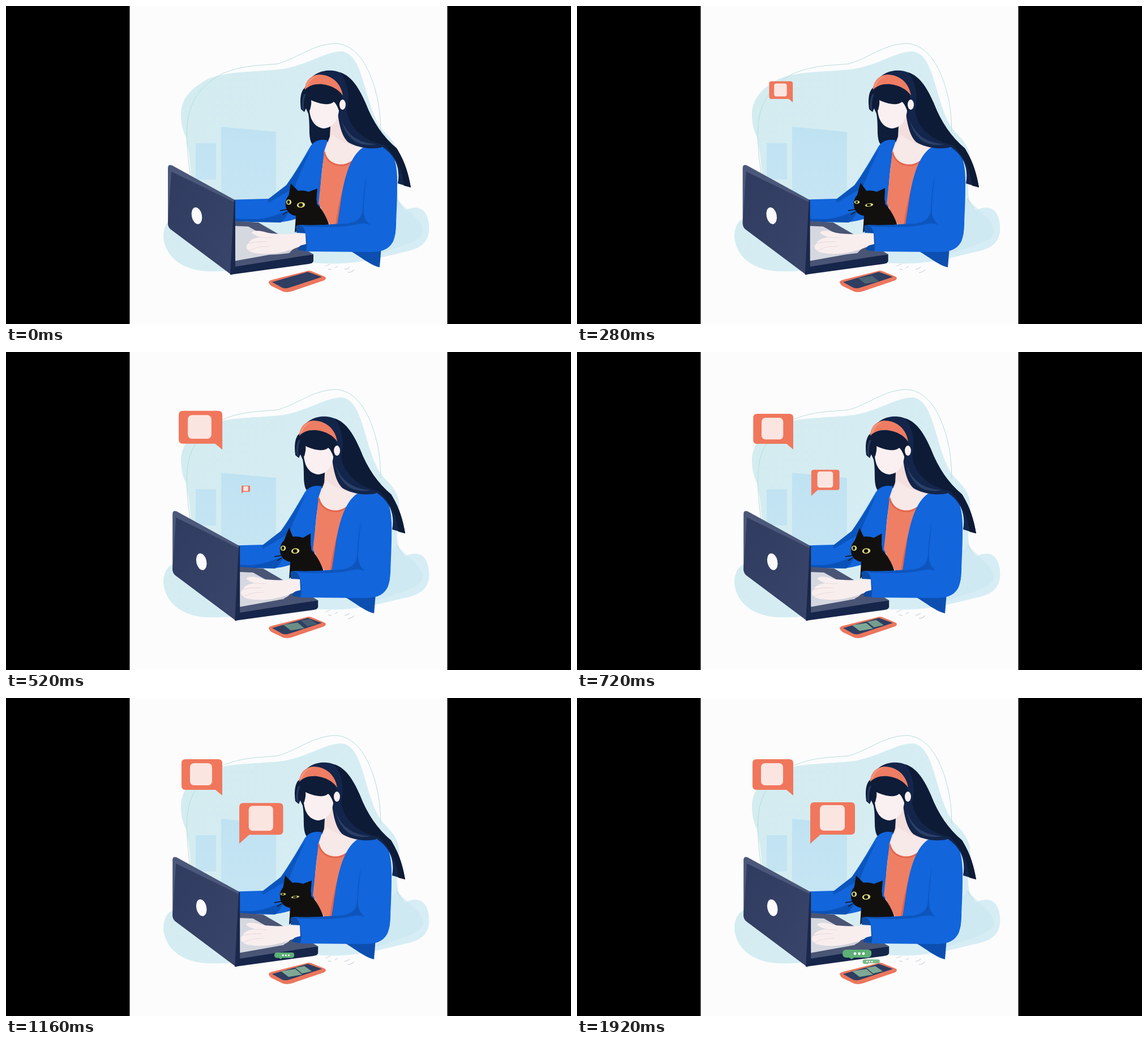
An HTML page that plays this animation: 998x561 px, repeating every 1960 ms.

```html
<!DOCTYPE html>
<html lang="en">
<head>
<meta charset="utf-8">
<title>Working with a cat</title>
<style>
  html, body { margin: 0; width: 100%; height: 100%; overflow: hidden; background: #000; }
  svg { display: block; width: 100%; height: 100%; }
</style>
</head>
<body>
<svg viewBox="0 0 998 561">
  <defs>
    <linearGradient id="mist" x1="0" y1="0" x2="1" y2=".5">
      <stop offset="0" stop-color="#d3ecef"/>
      <stop offset="1" stop-color="#d7edf5"/>
    </linearGradient>
    <linearGradient id="tower" x1="0" y1="0" x2="0" y2="1">
      <stop offset="0" stop-color="#bfe2f2"/>
      <stop offset="1" stop-color="#c6e5f3"/>
    </linearGradient>
    <linearGradient id="lid" x1="0" y1="0" x2="1" y2="1">
      <stop offset="0" stop-color="#303b60"/>
      <stop offset="1" stop-color="#39456a"/>
    </linearGradient>
    <clipPath id="screen"><path d="M470 487L533 469L558 478L500 497Q494 499 488 497Z"/></clipPath>
  </defs>

  <rect x="218.500" width="561" height="561" fill="#fcfcfd"/>

  <g id="backdrop">
    <path fill="url(#mist)" d="M309 190C310 160 330 143 358 128C395 114 440 117 490 111C535 103 560 82 592 80C612 82 621 102 629 126C640 160 648 200 668 222C688 242 698 255 694 290C688 325 690 350 706 360C728 350 744 358 747 385C750 412 737 427 708 433C660 444 620 457 560 454C500 450 430 470 355 468C315 466 282 446 278 408C278 388 286 376 300 372L326 350C329 310 326 270 318 232C311 217 309 205 309 190Z"/>
    <path fill="#c8e5ef" opacity=".5" d="M690 340C710 362 738 380 737 398C732 416 705 422 650 440L640 400Z"/>
    <path fill="url(#tower)" d="M335 242H371V306H335ZM380 213L477 222V345H380Z"/>
    <path fill="none" stroke="#b7ddd9" stroke-width="1" d="M325 296C322 270 318 240 320 212C322 170 345 137 385 118C420 104 450 105 480 102C520 90 540 68 582 66C622 68 642 112 652 147C660 175 661 195 662 222M689 340L701 357"/>
  </g>

  <g class="body">
    <path fill="#0d1d3a" d="M526 172L534 190C538 212 533 232 541 244C553 246 560 240 570 240C577 226 576 208 574 198Z"/>
    <path fill="#1265db" d="M568 237C556 234 545 237 538 247C524 271 509 297 495 316L464 340L390 342V379L487 381C505 379 525 372 555 360C554 315 559 270 568 237Z"/>
    <path fill="#0b52b8" d="M390 375L440 376C465 376 480 366 501 361C494 373 490 380 485 382L390 380Z"/>
    <path fill="#0b55bd" d="M539 252C528 276 515 304 510 320L464 347L462 342L496 316C511 296 526 270 539 252Z"/>
    <path fill="#f3dfde" d="M574 195L572 230C569 240 565 245 562 257C568 278 590 286 612 276L634 250C612 246 594 230 590 190Z"/>
    <path fill="#f7e9e8" d="M576 226C570 244 565 250 563 260C572 278 592 283 612 274L634 250C615 248 590 240 576 226Z"/>
    <path fill="#ee7f65" d="M562 257C567 280 592 288 613 273L592 386H572L552 348Z"/>
    <path fill="none" stroke="#e4654b" stroke-width="3" d="M562 257C567 280 592 288 612 274"/>
    <path fill="#e4654b" d="M612 275C599 302 587 345 582 386H588L610 300Z"/>
    <path fill="#0d4fb0" d="M600 428C625 440 640 456 660 461L663 425Z"/>
    <path fill="#1265db" d="M630 250C609 264 598 300 592 340L585 386L640 432C675 432 688 415 688 395C690 365 691 340 691 318C692 290 688 268 680 257C667 246 648 246 630 250Z"/>
  </g>

  <g class="body">
    <path fill="#13254a" d="M526 150C534 122 555 112 577 114C606 117 622 143 635 171C648 205 667 232 690 251C705 275 711 297 715 320L692 313C697 287 688 263 665 249C642 255 617 248 604 240C590 226 587 200 584 172Z"/>
    <path fill="#0d1b37" d="M590 117C612 124 625 148 635 171C648 205 667 232 690 251C705 275 711 297 715 320L703 317C701 290 689 264 668 245C632 238 606 215 602 184C608 160 604 135 590 117Z"/>
    <path fill="#2b4069" d="M592 200C604 231 624 241 655 244C625 249 602 238 592 200Z"/>
    <path fill="#faf0f1" d="M536 172C534 201 546 215 562 216C577 214 586 204 589 180L585 160H540Z"/>
    <path fill="#0e1c38" d="M525 147C536 136 562 135 582 146C591 152 595 159 595 168C590 170 589 178 590 190C586 178 583 172 579 169C570 177 552 172 539 166C540 173 538 178 537 184L531 178L527 187L521 182C519 166 520 155 525 147Z"/>
    <path fill="#233860" d="M526 156C522 166 522 174 523 181L527 186C525 174 526 164 530 155Z"/>
    <ellipse cx="594.500" cy="174" rx="5.500" ry="9" fill="#faf0f1"/>
    <path fill="#ee7d63" d="M528 148C528 133 538 122 553 121C575 121 592 136 595 158C587 147 575 140 559 138C546 137 535 140 528 148Z"/>
    <path fill="#f4947c" d="M529 144C531 131 540 125 551 123C540 128 535 135 533 142Z"/>
  </g>

  <g class="body" id="cat" fill="#12100f">
    <path d="M510 400L512 370C503 369 495 363 494 352C493 343 497 335 503 331C512 324 528 324 537 329C545 332 550 340 549 349C558 358 565 370 570 384V392H518Z"/>
    <path id="earL"/>
    <path id="earR"/>
    <g id="eyeL">
      <ellipse rx="4.700" ry="4.500" fill="#dfe07f"/><ellipse cx="-.5" rx="2.300" ry="3"/>
    </g>
    <g id="eyeR">
      <ellipse rx="7.200" ry="4.800" fill="#dfe07f"/><ellipse cx="-.5" rx="3.800" ry="3.300"/>
    </g>
    <path fill="none" stroke="#12100f" stroke-width="1.300" d="M496 359L484 361M497 363L489 368"/>
  </g>

  <g id="laptop">
    <path fill="#4a5575" d="M402 379L446 382L543 438L402 463Z"/>
    <path fill="#d6d8e0" d="M403 388L428 389L494 426Q490 434 470 438L403 450Z"/>
    <path fill="#16254a" d="M396 474L404 460L543 438V450Q542 454 535 455Z"/>
    <path fill="#4b587a" d="M286 286Q286 279 293 281L404 342V460L398 474L291 394Q286 390 286 383Z"/>
    <path fill="url(#lid)" d="M292 292L403 346L400 474H398L291 394Q286 390 286 383Z"/>
    <path fill="#1a284b" d="M403 342L405 343V461L399 474H396Z"/>
    <ellipse cx="337" cy="370" rx="9" ry="15" transform="rotate(-12 337 370)" fill="#fbfbfd"/>
  </g>

  <g class="body">
    <path fill="#cfd0d9" d="M432 429C445 441 470 440 500 436L508 428Z"/>
    <path fill="#f9eeee" d="M531 401C508 402 482 404 462 400C449 396 438 395 434 400C440 405 446 406 449 408C438 409 430 413 429 418C424 422 423 429 429 431C433 436 443 436 450 437C470 439 492 434 507 429C518 424 525 423 533 421Z"/>
    <path fill="none" stroke="#eadadb" stroke-width="1.200" d="M449 408L470 409M429 419C440 415 450 416 462 416M430 431C442 425 452 424 465 424"/>
    <path fill="#0d4ba4" d="M512 390Q512 386 520 386L532 388L534 433L517 431C514 428 517 424 522 422L530 420L529 401L513 400Z"/>
    <path fill="#1265db" d="M519 386C540 388 565 386 590 384C610 384 624 382 634 360L688 350C690 380 690 400 684 415C675 432 660 434 640 434L530 433C533 418 531 402 526 392Z"/>
    <path fill="#0d55bd" d="M637 297C634 325 631 350 632 366C634 376 638 381 643 386C630 381 622 385 605 388C580 391 550 390 522 389L519 386C550 388 575 385 600 384C620 382 629 374 630 358C631 338 633 318 637 297Z"/>
  </g>

  <g id="phone">
    <path fill="#ec765d" d="M464 487Q465 484 470 483L530 468Q535 466 540 468L562 477Q568 480 562 484L506 503Q498 506 490 504L469 494Q464 490 464 487Z"/>
    <path fill="#2f3e61" d="M470 487L533 469L558 478L500 497Q494 499 488 497Z"/>
    <g clip-path="url(#screen)" fill="#7fa995">
      <path id="cardA" d="M486 482L511 478L523 488L499 492Z"/>
      <path id="cardB" d="M511 476L527 473L540 482L523 486Z"/>
    </g>
    <path fill="none" stroke="#d3dade" stroke-width="1.300" d="M564 459L573 455M569 464L575 465M581 462L586 459M598 464Q603 465 607 460M604 470Q611 470 615 465"/>
  </g>

  <g id="popA">
    <path fill="#f0775c" d="M317 108H375Q382 108 382 115V172L370 162H317Q310 162 310 155V115Q310 108 317 108Z"/>
    <rect x="325" y="115" width="39" height="39" rx="7" fill="#fbe5e1"/>
  </g>
  <g id="popB">
    <path fill="#f0775c" d="M419 184H484Q491 184 491 191V234Q491 241 484 241H430L412 257V191Q412 184 419 184Z"/>
    <rect x="429" y="189" width="44" height="45" rx="7" fill="#fbe5e1"/>
  </g>
  <g id="popC">
    <path fill="#5db076" d="M475 444H515Q521 445 520 451Q520 457 514 458H489L485 461L481 458H475Q469 457 469 451Q469 445 475 444Z"/>
    <g fill="#fff"><circle cx="491" cy="451" r="2.400"/><circle cx="498.500" cy="451" r="2.400"/><circle cx="506" cy="451" r="2.400"/></g>
  </g>
  <g id="popD">
    <path fill="#7dba8b" d="M508 461H532Q535 461 535 464.500Q535 468 531 468H515L512 470L510 469H507Q504 468 504 465Q504 461 508 461Z"/>
    <g fill="#fff"><circle cx="512" cy="465" r="1.400"/><circle cx="516.500" cy="465" r="1.400"/><circle cx="521" cy="465" r="1.400"/></g>
  </g>
</svg>

<script>
const LOOP = 1960, STEP = 40;
const $ = id => document.getElementById(id);
const bodies = document.querySelectorAll('.body');

// Each track is a list of [time, value] keys.
const tracks = {
  laptop: [[0, 0], [140, 3.6], [280, 6.7], [420, 7.9], [520, 8.2]],
  pop: [[20, 0], [105, .19], [280, .58], [465, .95], [520, 1.07], [560, 1.09],
        [615, 1.03], [680, .985], [745, .98], [880, .985], [1025, 1]],
  ears: [[120, 0], [280, .4], [520, 1], [640, 1], [880, .6], [1160, 0]],
  blink: [[160, 1], [240, .25], [280, .6], [360, 1], [1080, 1], [1160, .42], [1200, .2], [1320, 1]],
  cardA: [[160, 0], [280, .35], [520, .75], [700, 1]],
  cardB: [[400, 0], [520, .3], [760, 1]]
};

// Bubble id, the point it grows from, and its delay.
const pops = [
  ['popA', 380, 167, 0],
  ['popB', 417, 248, 415],
  ['popC', 485, 460, 825],
  ['popD', 526, 470, 1240]
];

function at(keys, t) {
  if (t <= keys[0][0]) return keys[0][1];
  for (let i = 1; i < keys.length; i++) {
    const [t0, a] = keys[i - 1], [t1, b] = keys[i];
    if (t <= t1) return a + (b - a) * (t - t0) / (t1 - t0);
  }
  return keys[keys.length - 1][1];
}

const move = (el, x, y = 0, more = '') => el.setAttribute('transform', `translate(${x} ${y}) ${more}`);

function slideCard(id, t, dx, dy) {
  const k = at(tracks[id], t);
  move($(id), dx * (1 - k), dy * (1 - k));
  $(id).setAttribute('opacity', k);
}

function draw(t) {
  const lean = (1 - Math.cos(Math.PI * Math.min(t / 560, 1))) / 2;
  bodies.forEach(el => move(el, -10 * lean));
  move($('laptop'), at(tracks.laptop, t));

  const ear = at(tracks.ears, t);
  $('earL').setAttribute('d', `M499 337L${503 + 7 * ear} ${313 - 3 * ear}L517 327L510 340Z`);
  $('earR').setAttribute('d', `M534 328L${550 - 2 * ear} ${322 - 2 * ear}L548 345L538 342Z`);
  const lid = `scale(1 ${at(tracks.blink, t)})`;
  move($('eyeL'), 499.5, 346, lid);
  move($('eyeR'), 521, 351, `rotate(-8) ${lid}`);

  slideCard('cardA', t, 16, -3);
  slideCard('cardB', t, 14, -3);

  for (const [id, x, y, delay] of pops) {
    const s = at(tracks.pop, t - delay);
    $(id).setAttribute('visibility', s > 0 ? 'visible' : 'hidden');
    move($(id), x, y, `scale(${s}) translate(${-x} ${-y})`);
  }
}

const start = performance.now();
function tick() {
  const t = (performance.now() - start) % LOOP;
  draw(Math.floor(t / STEP) * STEP);
  requestAnimationFrame(tick);
}
draw(0);
requestAnimationFrame(tick);
</script>
</body>
</html>
```
